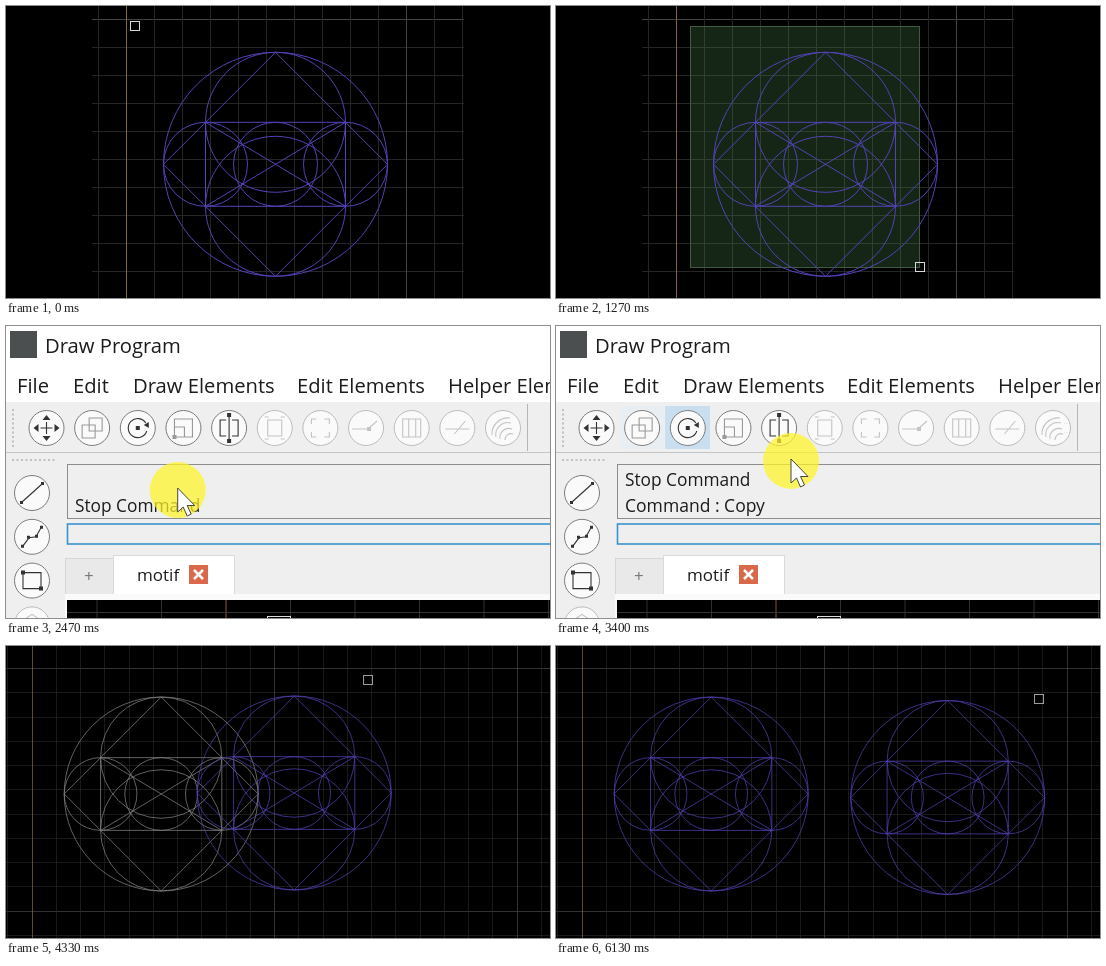
Recreate the animation shown at these times as an HTML page with a canvas. Size 544 by 292 pixels, loop 6190 ms.

```html
<!DOCTYPE html>
<html lang="en">
<head>
<meta charset="utf-8">
<title>Copying a motif</title>
<style>
html, body { margin: 0; height: 100%; overflow: hidden; background: #000; }
canvas { display: block; }
</style>
</head>
<body>
<canvas id="stage" width="544" height="292"></canvas>
<script>
const W = 544, H = 292, LOOP = 6190;
const PURPLE = '#5143b4', BLUE = '#467aae', GRAY = '#858585';
const ctx = document.getElementById('stage').getContext('2d');

function box(x, y, w, h, fill, stroke) {
  if (fill) { ctx.fillStyle = fill; ctx.fillRect(x, y, w, h); }
  if (stroke) { ctx.strokeStyle = stroke; ctx.strokeRect(x, y, w, h); }
}

function line(x1, y1, x2, y2, color) {
  ctx.strokeStyle = color;
  ctx.beginPath();
  ctx.moveTo(x1, y1);
  ctx.lineTo(x2, y2);
  ctx.stroke();
}

function disc(x, y, r, fill, stroke) {
  ctx.beginPath();
  ctx.arc(x, y, r, 0, 7);
  if (fill) { ctx.fillStyle = fill; ctx.fill(); }
  if (stroke) { ctx.strokeStyle = stroke; ctx.stroke(); }
}

function text(str, x, y, size, color = '#1c1c1c') {
  ctx.font = size + 'px "Open Sans", "Noto Sans", sans-serif';
  ctx.fillStyle = color;
  ctx.fillText(str, x, y);
}

// Keys are [time, x, y]; eased between neighbours.
function track(t, keys, ease = p => p) {
  if (t <= keys[0][0]) return keys[0].slice(1);
  for (let i = 1; i < keys.length; i++) {
    const [t0, x0, y0] = keys[i - 1], [t1, x1, y1] = keys[i];
    if (t < t1) {
      const p = ease((t - t0) / (t1 - t0));
      return [x0 + (x1 - x0) * p, y0 + (y1 - y0) * p];
    }
  }
  return keys[keys.length - 1].slice(1);
}

const smooth = p => p * p * (3 - 2 * p);
const easeOut = p => 1 - Math.pow(1 - p, 2.2);

// ox, oy: a crossing of major lines; every tenth line is major.
function grid(ox, oy, step, left, right) {
  const snap = v => Math.floor(v) + 0.5;
  const tone = k => k % 10 ? '#252525' : '#454440';
  for (let k = -1; oy + k * step < H; k++)
    line(left, snap(oy + k * step), right, snap(oy + k * step), tone(k));
  for (let k = -1; ox + k * step < right; k++)
    line(snap(ox + k * step), 0, snap(ox + k * step), H, k ? tone(k) : '#86653a');
}

function motif(cx, cy, u, color) {
  const r = 4 * u, a = 2.5 * u, b = 1.5 * u;
  ctx.strokeStyle = color;
  ctx.beginPath();
  for (const [x, y, rad] of [[0, 0, r], [0, -b, a], [0, b, a], [-a, 0, b], [0, 0, b], [a, 0, b]]) {
    ctx.moveTo(cx + x + rad, cy + y);
    ctx.arc(cx + x, cy + y, rad, 0, 2 * Math.PI);
  }
  ctx.moveTo(cx, cy - r);
  ctx.lineTo(cx + r, cy);
  ctx.lineTo(cx, cy + r);
  ctx.lineTo(cx - r, cy);
  ctx.closePath();
  ctx.rect(cx - a, cy - b, 2 * a, 2 * b);
  for (const s of [-1, 1]) {
    ctx.moveTo(cx - a, cy - s * b);
    ctx.lineTo(cx + a, cy + s * b);
  }
  ctx.stroke();
}

function cursor([x, y]) {
  box(Math.round(x) - 4.5, Math.round(y) - 4.5, 9, 9, null, '#d8d8d8');
}

function selecting(t) {
  const selected = t >= 2130;
  const pos = t < 70 ? [129, 20] : track(t, [[400, 135, 20], [1800, 395, 293]], easeOut);
  grid(120, 13, 28, 86, 458);
  if (t >= 400 && !selected)
    box(134.5, 20.5, Math.round(pos[0]) - 135, Math.round(pos[1]) - 20,
      'rgba(75,125,75,.3)', '#3f5a3f');
  motif(269.5, 158.3, 28, selected ? BLUE : PURPLE);
  cursor(pos);
}

// Outline and solid parts of each tool, around the middle of its button.
const DARK = '#333', MID = '#999', PALE = '#c4c4c4';
const tools = [
  [DARK, 'M-6 0H6M0-6V6', 'M-13 0l5-4v8zM13 0l-5-4v8zM0-13l-4 5h8zM0 13l-4-5h8z'],
  [MID, 'M-10-3h13v13h-13zM-3-10h13v13h-13z', ''],
  [DARK, 'M8-5A9.5 9.5 0 1 0 9 3', 'M-2-2h4v4h-4zM11-6v6l-5-3z'],
  [MID, 'M-9-9h18v18h-18zM-9-1h10v10', 'M-11 7h4v4h-4z'],
  [DARK, 'M0-15V15M-3-8h-6v16h6M3-8h6v16h-6', 'M-2-15h4v4h-4zM-2 11h4v4h-4z'],
  [PALE, 'M-7-8h14v16h-14zM-10-11h4M6-11h4M-10 11h4M6 11h4', ''],
  [PALE, 'M-9-4v-5h5M4-9h5v5M9 4v5h-5M-4 9h-5v-5', ''],
  [PALE, 'M-14 1H4M3 0l8-7', 'M1-1h4v4h-4z'],
  [PALE, 'M-9-9h18v18h-18zM-3-9v18M4-9v18', ''],
  [PALE, 'M-12 1H12M-3 6l11-13', ''],
  [PALE, 'M-11 7a16 16 0 0 1 18-17M-7 9a12 12 0 0 1 15-14M-3 11a9 9 0 0 1 12-10M2 12a6 6 0 0 1 8-6', '']
];
const shapes = [
  [DARK, 'M-10 9L10-9', 'M-12 8h3v3h-3zM9-11h3v3h-3z'],
  [DARK, 'M-9 9L-3 1L4 0L9-9', 'M-11 8h3v3h-3zM-5-1h3v3h-3zM3-2h3v3h-3zM8-11h3v3h-3z'],
  [DARK, 'M-9-8h18v16h-18z', 'M-11-10h4v4h-4zM7 6h4v4h-4z'],
  [PALE, 'M-9-4L0-10L9-4V6H-9z', '']
];

function button(x, y, color, outline, solid) {
  disc(x, y, 17.5, '#fafafa', color === PALE ? '#bcbcbc' : '#7c7c7c');
  ctx.save();
  ctx.translate(x, y);
  ctx.lineWidth = 1.1;
  ctx.strokeStyle = ctx.fillStyle = color;
  ctx.stroke(new Path2D(outline));
  ctx.fill(new Path2D(solid));
  ctx.restore();
}

function pointer([x, y]) {
  ctx.save();
  ctx.translate(x, y);
  disc(0, 2, 28, 'rgba(255,246,40,.72)');
  const arrow = new Path2D('M0 0V24L5.5 19L9.5 28L13.5 26L9.5 17.5H17z');
  ctx.fillStyle = '#fff';
  ctx.strokeStyle = '#444';
  ctx.fill(arrow);
  ctx.stroke(arrow);
  ctx.restore();
}

function choosing(t) {
  const pos = track(t, [[2200, 300, 250], [2670, 90, 106], [3000, 90, 106], [3400, 235, 133]], smooth);
  const copying = t >= 2800;

  box(0, 0, W, H, '#efefef');
  box(0, 0, W, 76, '#fff');
  box(4, 5, 27, 27, '#4b4f50');
  text('Draw Program', 39, 27, 20.2);
  [['File', 11], ['Edit', 67], ['Draw Elements', 127], ['Edit Elements', 291], ['Helper Elements', 442]]
    .forEach(([name, x]) => text(name, x, 67, 20.2));

  for (let i = 0; i < 9; i++) box(6, 83 + i * 4.5, 2, 2, '#c0c0c0');
  for (let i = 0; i < 10; i++) box(6 + i * 4.5, 133, 2, 2, '#c0c0c0');
  if (pos[0] < 108 && pos[1] < 124) box(64, 80, 44, 43, '#c9dfef');
  else if (copying) box(64, 80, 44, 43, '#e9eef2');
  if (pos[0] >= 108 && copying) box(109, 80, 45, 43, '#c9dfef');
  tools.forEach((tool, i) => button(40.5 + i * 45.65, 102, ...tool));
  line(521.5, 78, 521.5, 125, '#b5b5b5');
  line(0, 126.5, W, 126.5, '#c4c4c4');
  shapes.forEach((shape, i) => button(26, 167 + i * 43.8, ...shape));

  box(61.5, 138.5, W, 54, '#efefef', '#8c8c8c');
  if (copying) {
    text('Stop Command', 69, 160, 17.3);
    text('Command : Copy', 69, 186, 17.5);
  } else {
    text('Stop Command', 69, 186, 17.3);
  }
  ctx.lineWidth = 1.6;
  box(61.5, 198, W, 20, '#efefef', '#3b93cc');
  ctx.lineWidth = 1;

  box(59.5, 232.5, 48, 36, '#e9e9e9', '#d6d6d6');
  text('+', 78, 256, 17, '#777');
  box(107.5, 229.5, 121, 39, '#fff', '#dadada');
  text('motif', 131, 255, 17);
  box(183, 239, 19, 19, '#d9694a');
  ctx.lineWidth = 2.5;
  line(188, 244, 197, 253, '#fff');
  line(197, 244, 188, 253, '#fff');
  ctx.lineWidth = 1;

  box(59, 268, W, 24, '#fafafa');
  box(61, 274, W, 18, '#000');
  for (let k = -2; k < 6; k++)
    line(220 + k * 64.5, 274, 220 + k * 64.5, H, k ? '#303030' : '#8a5a36');
  line(61, 286.5, W, 286.5, '#333');
  box(261.5, 290.5, 23, 23, null, '#ddd');
  pointer(pos);
}

function copying(t) {
  const [dx, dy] = track(t, [
    [3630, 0, 0], [4330, 133, -1], [4750, 246, 3], [5000, 238, 4], [5200, 236.5, 3.5]
  ], p => p * (2.6 - p * p * 0.6) / 2);
  const u = 24.25;
  // The zoomed-out view is fainter.
  ctx.globalAlpha = 0.72;
  grid(26, 22.6, u, 0, W);
  motif(155.2, 148, u, t < 5530 ? GRAY : PURPLE);
  if (t >= 3670) motif(155.2 + dx, 148 + dy, u, PURPLE);
  cursor(t < 6000 ? [229 + dx, 34.6 + dy] : track(t, [[6000, 466, 38], [6130, 483, 53]]));
  ctx.globalAlpha = 1;
}

function draw(now) {
  const t = now % LOOP;
  ctx.lineWidth = 1;
  box(0, 0, W, H, '#000');
  (t < 2200 ? selecting : t < 3530 ? choosing : copying)(t);
}

let start;
function tick(now) {
  start ??= now;
  draw(now - start);
  requestAnimationFrame(tick);
}
draw(0);
requestAnimationFrame(tick);
</script>
</body>
</html>
```
